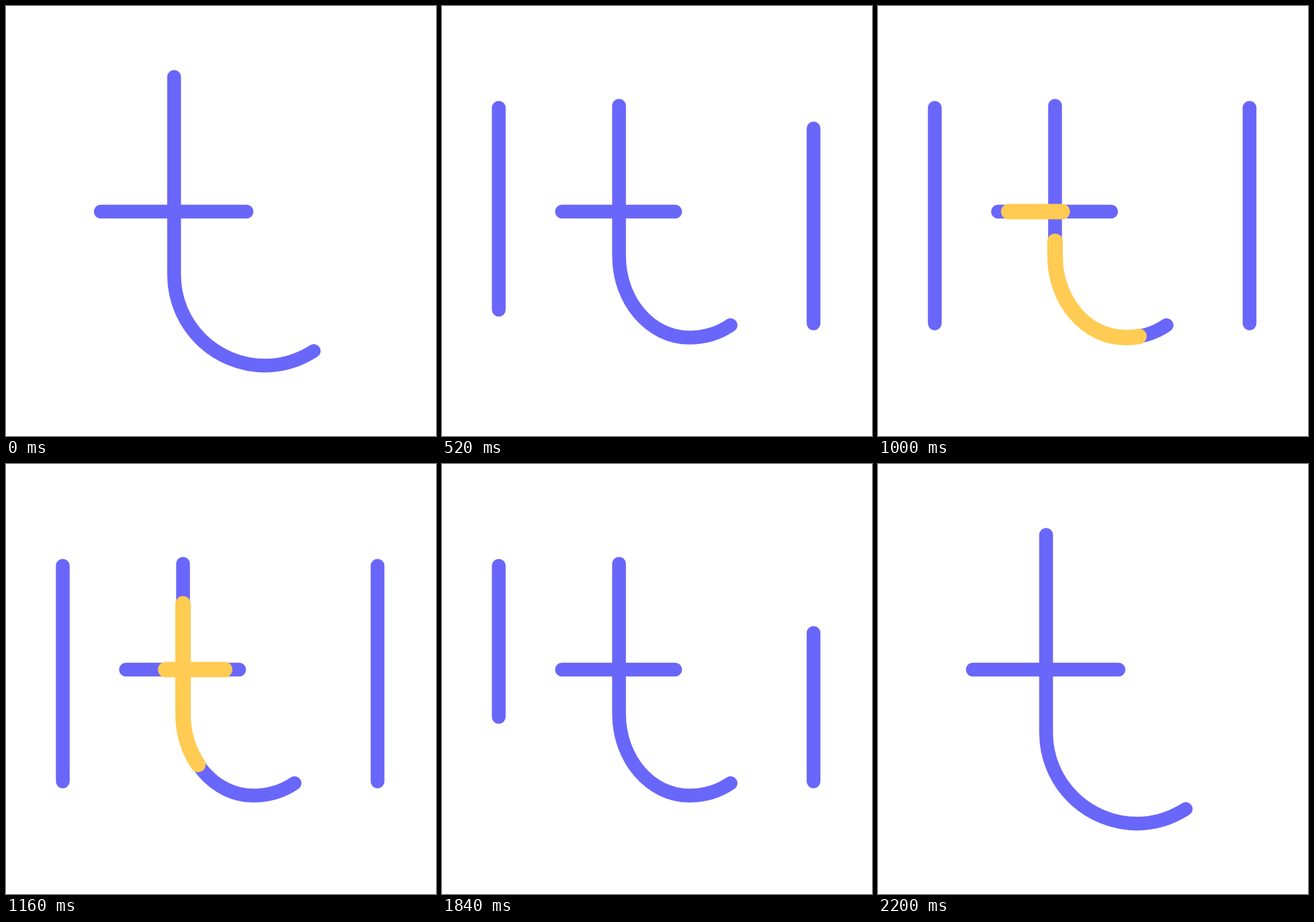
Recreate the animation shown at these times as an HTML page. Size 640x640 px, loop 2600 ms.

```html
<!DOCTYPE html>
<html lang="en">
<head>
<meta charset="utf-8">
<title>Letter loop</title>
<style>
  html, body { margin: 0; width: 100%; height: 100%; overflow: hidden; background: #fff; }
  svg { display: block; width: 100%; height: 100%; }
  path { fill: none; stroke: #6966fa; stroke-width: 20.5; stroke-linecap: round; stroke-linejoin: round; }
  .glow { stroke: #ffcb52; stroke-width: 23; }
</style>
</head>
<body>
<svg viewBox="0 0 640 640">
  <path id="left"/>
  <path id="right"/>
  <path id="stem"/>
  <path id="cross"/>
  <path id="stemGlow" class="glow" pathLength="1"/>
  <path id="crossGlow" class="glow" pathLength="1"/>
</svg>
<script>
const LOOP = 2600, STEP = 20;
const el = id => document.getElementById(id);
const ramp = (t, from, to) => Math.min(1, Math.max(0, (t - from) / (to - from)));
const ease = (t, from, to) => {
  const u = ramp(t, from, to);
  return u * u * (3 - 2 * u);
};

// Stem points run from the hook's tip to the top.
const BIG = {
  stem: [458, 513.5, 437, 527, 412, 535.2, 386, 535.2, 311, 535.2, 250.2, 475, 250.2, 400, 250.2, 105.5],
  cross: [141, 306, 358, 306]
};
const SMALL = {
  stem: [429.5, 475, 412, 487, 391, 493.5, 368, 493.5, 310, 493.5, 263.5, 439, 263.5, 372, 263.5, 148.5],
  cross: [178.5, 306, 347, 306]
};
const TOP = 151.5, BOTTOM = 472.5;

const mix = (a, b, k) => a.map((v, i) => v + (b[i] - v) * k);
const stemPath = p => `M${p.slice(0, 2)}C${p.slice(2, 14)}L${p.slice(14)}`;
const crossPath = p => `M${p.slice(0, 2)}L${p.slice(2)}`;

function bar(id, x, from, grow) {
  const to = from === TOP ? BOTTOM : TOP;
  el(id).setAttribute("d", grow > 0 ? `M${x} ${from}V${from + (to - from) * grow}` : "");
}

function trim(id, d, start, end) {
  const path = el(id), visible = end > start;
  path.setAttribute("d", visible ? d : "");
  if (visible) {
    path.setAttribute("stroke-dasharray", `${end - start} 2`);
    path.setAttribute("stroke-dashoffset", -start);
  }
}

function draw(t) {
  const shrink = ease(t, 140, 490) - ease(t, 1850, 2200);
  const stem = stemPath(mix(BIG.stem, SMALL.stem, shrink));
  const cross = crossPath(mix(BIG.cross, SMALL.cross, shrink));
  el("stem").setAttribute("d", stem);
  el("cross").setAttribute("d", cross);

  bar("left", 84.5, TOP, ease(t, 224, 574) - ease(t, 1713, 2063));
  bar("right", 553, BOTTOM, ease(t, 237, 587) - ease(t, 1710, 2060));

  const start = ramp(t, 940, 1568), end = ramp(t, 702, 1227);
  trim("stemGlow", stem, start, end);
  trim("crossGlow", cross, start, end);
}

const begin = performance.now();
function tick() {
  const t = (performance.now() - begin) % LOOP;
  draw(t - t % STEP);
  requestAnimationFrame(tick);
}
tick();
</script>
</body>
</html>
```
